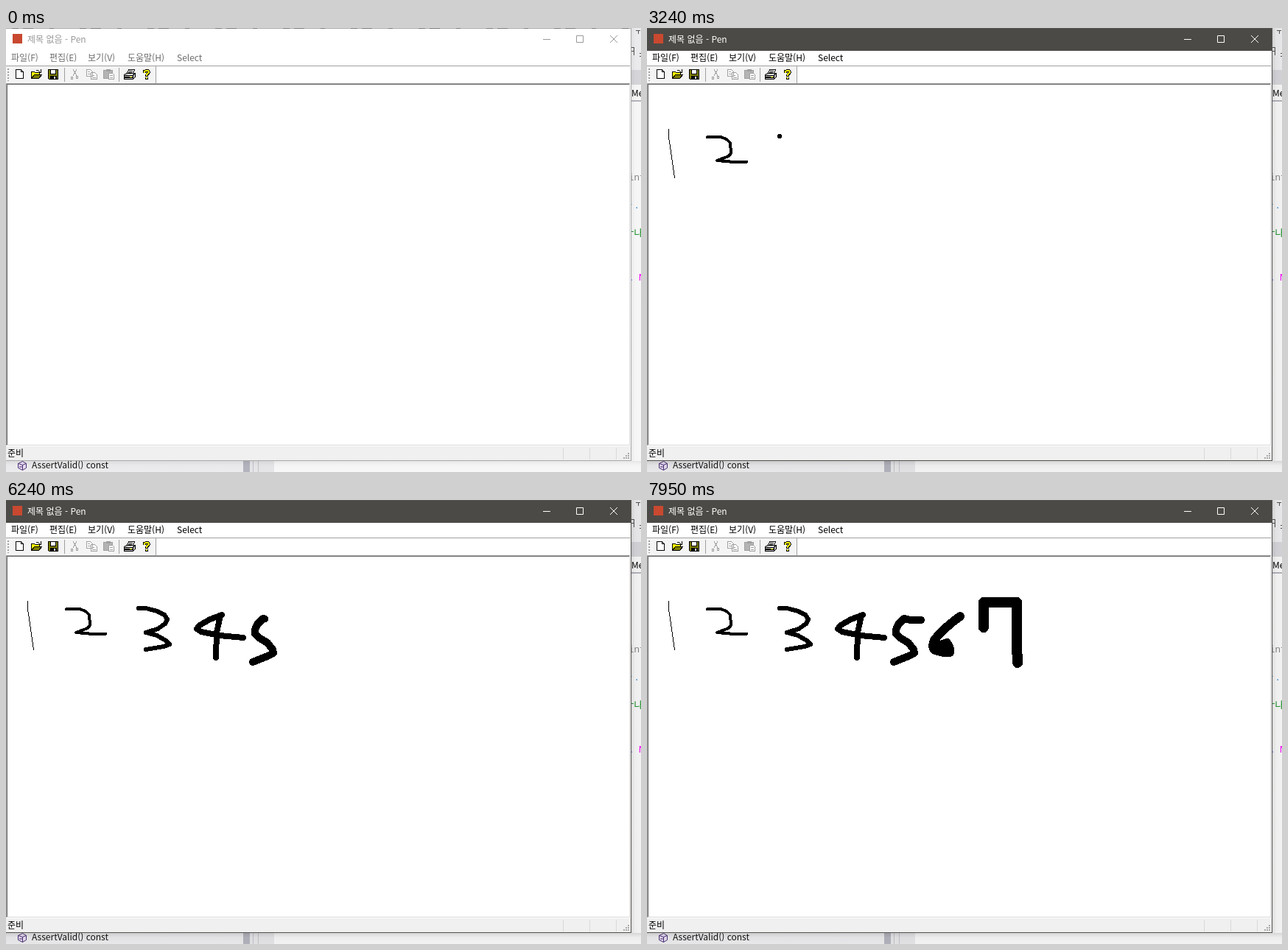
An HTML page that plays this animation: 862x603 px, repeating every 8000 ms.

```html
<!DOCTYPE html>
<html lang="ko">
<head>
<meta charset="utf-8">
<title>Pen</title>
<style>
  html, body { margin: 0; width: 100%; height: 100%; overflow: hidden; background: #fff; }
  svg {
    display: block; width: 862px; height: 603px;
    --bar: #fff; --title: #999; --menu: #6d6d6d; --control: #999; --edge: #a9a9a9; --shade: .6;
    font: 12px "Noto Sans CJK KR", "Noto Sans CJK", "Noto Sans", sans-serif;
  }
  svg.active { --bar: #4c4a46; --title: #fff; --menu: #000; --control: #fff; --edge: #55534f; --shade: 1; }
  .bar { fill: var(--bar); }
  .title { fill: var(--title); }
  .menu { fill: var(--menu); }
  .control { fill: none; stroke: var(--control); }
  .edge { fill: none; stroke: var(--edge); }
  .shadow { opacity: var(--shade); }
  .active .remnant { display: none; }
  .code { font: 12.5px "Noto Sans Mono", "Noto Sans CJK KR", monospace; }
  .crisp, #ink { shape-rendering: crispEdges; }
  #ink { fill: none; stroke: #000; stroke-linecap: round; stroke-linejoin: round; }
</style>
</head>
<body>
<svg id="stage" viewBox="0 0 862 603">
  <defs>
    <linearGradient id="side">
      <stop offset="0" stop-opacity=".16"/><stop offset=".4" stop-opacity=".07"/><stop offset="1" stop-opacity=".05"/>
    </linearGradient>
    <linearGradient id="under" href="#side" x2="0" y2="1"/>
  </defs>

  <!-- editor behind the window -->
  <rect width="862" height="603" fill="#fff"/>
  <g class="crisp">
    <path fill="#f3f3f5" d="M848 0h14v57h-14zM0 587h322v16H0z"/>
    <path fill="#dcdce1" d="M848 57h14v20h-14z"/>
    <path fill="#b9b9c4" d="M848 98h14v2h-14zM322 587h9v16h-9z"/>
    <path fill="#ededf0" d="M331 587h33v16h-33z"/>
    <path fill="#c8c8d0" d="M335 587h1v16h-1zM342 587h1v16h-1z"/>
    <path fill="none" stroke="#555" d="M847 26.5h5.5v10M847 31.5h5M860 34.5h2M860 38.5h2M855 3.5h6M858.5 3v5"/>
  </g>
  <text x="849" y="93">Me</text>
  <g class="code">
    <text x="845" y="207" fill="#888">int</text>
    <text x="841" y="245" fill="#1683d8">ㅏ.</text>
    <text x="841" y="283" fill="#078a16">ㅜ나</text>
    <text x="845" y="343" fill="#00f">.</text>
    <text x="859" y="343" fill="#f0f">N</text>
  </g>
  <g fill="#eee6fa" stroke="#51327b">
    <path d="M16.5 591.5l6-3 5 3v6l-5 3-6-3z"/>
    <path fill="none" d="M16.5 591.5l6 2 5-2M22.5 593.5v7M18 596h5"/>
  </g>
  <text x="35" y="598" fill="#111">AssertValid() const</text>
  <g class="shadow">
    <rect x="848" width="14" height="588" fill="url(#side)"/>
    <rect y="588" width="862" height="15" fill="url(#under)"/>
  </g>

  <!-- window frame -->
  <g class="crisp">
    <rect width="848" height="587" fill="#fff"/>
    <rect class="bar" width="848" height="31"/>
    <path class="edge" d="M0 .5h848.5v587H0"/>
    <path class="remnant" stroke="#777" stroke-dasharray="9 6 14 22 6 35" d="M8 .5h838"/>
    <path fill="#f0f0f0" d="M0 568h848v19H0z"/>
    <path fill="#f4f4f4" d="M0 52h203v23H0z"/>
    <path fill="none" stroke="#a0a0a0" d="M0 51.5h847M203.5 52v23M79.5 54v19M153.5 54v19M0 75.5h847M.5 76v491"/>
    <path fill="none" stroke="#696969" d="M1 76.5h845M1.5 76v490"/>
    <path fill="none" stroke="#d9d9d9" d="M1 566.5h846M846.5 76v491M756.5 570v16M792.5 570v16M828.5 570v16"/>
    <path stroke="#a0a0a0" stroke-width="2" stroke-dasharray="2 2" d="M3 55v17"/>
    <path stroke="#aaa" stroke-width="2" stroke-dasharray="2 1" d="M844 578h2M841 581h5M838 584h8"/>
  </g>
  <rect x="9" y="8" width="13" height="13" fill="#c8492f"/>
  <text class="title" x="29" y="20">제목 없음 - Pen</text>
  <path class="control" d="M729 15.5h10M774.5 10.5h9v9h-9zM820 10l10 10M830 10l-10 10"/>
  <g class="menu">
    <text x="7" y="45">파일(F)</text>
    <text x="59" y="45">편집(E)</text>
    <text x="111" y="45">보기(V)</text>
    <text x="165" y="45">도움말(H)</text>
    <text x="232" y="45">Select</text>
  </g>
  <text x="2" y="582">준비</text>

  <!-- toolbar icons -->
  <g class="crisp" stroke="#000" fill="#fff">
    <path d="M13.5 56.5h7l3 3v9h-10zM20.5 56.5v3h3"/>
    <path fill="#ff0" d="M34.5 68.5v-9h4l1 1h6v3"/>
    <path fill="#808000" d="M34.5 68.5l4-5h10l-4 5z"/>
    <path fill="none" d="M41 57.5h2l3 2M47.5 56v4h-4"/>
    <path fill="#808000" d="M57.5 56.5h13v13h-12l-1-1z"/>
    <path d="M60.5 56.5h7v6h-7z"/>
    <path fill="#000" d="M60.5 65.5h8v4h-8z"/>
    <path stroke="#fff" stroke-width="2" d="M66 66v3"/>
    <g stroke="#a0a0a0">
      <path fill="none" d="M91 56l5 9M96 56l-5 9M88.5 66.5h2v3h-2zM95.5 65.5h2v3h-2z"/>
      <path d="M109.5 56.5h5l3 3v6h-8zM115.5 60.5h5l3 3v6h-8z"/>
      <path d="M111 59.5h3M111 62.5h4M117 64.5h3M117 67.5h5"/>
      <path fill="#b4b4b4" d="M132.5 57.5h12v11h-12zM136 56.5h5v2h-5z"/>
      <path d="M139.5 61.5h5l2 2v6h-7zM141 64.5h4M141 67.5h4"/>
    </g>
    <path d="M164.5 61.5l2-5h8l-2 5zM167 58.5h5M166 60.5h5"/>
    <path fill="#c0c0c0" d="M160.5 63.5l3-2h12v5l-3 3h-12zM160 64.5h12l3-3M172.5 65v4"/>
    <path stroke-width="2" d="M161 67h11"/>
    <path stroke="#ff0" d="M168 66.5h3"/>
    <g fill="none">
      <path stroke-width="4" d="M188 61v-2l2-1h3l1 2-3 4v2M191 67v3"/>
      <path stroke="#ff0" stroke-width="2" d="M188 61v-2l2-1h3l1 2-3 3v2M191 67v2"/>
    </g>
  </g>
  <g id="ink"></g>
</svg>
<script>
const LOOP = 8000, TICK = 30, ACTIVATED = 1080;
const stage = document.getElementById('stage');
const ink = document.getElementById('ink');

// from, until: drawing time in ms; lead: share already drawn at the first moment
const strokes = [
  { from: 1140, until: 1290, width: 1, lead: .1, d: 'M29.5 137.5V148L37.5 203.5' },
  { from: 2040, until: 2460, width: 4, d: 'M82 148H100L108 151L113 156L114 170L111 174L95 180L107 181L118 182H135' },
  { from: 3240, until: 3720, width: 6, d: 'M180 147H190L205 151L215 156L219 162L216 168L206 175L190 180L205 184L217 191L222 196L214 199L190 203' },
  { from: 4590, until: 4830, width: 8, lead: .17, d: 'M293 156L277 162L263 170L259 175L265 179L290 184L322 187' },
  { from: 5130, until: 5250, width: 8, lead: .15, d: 'M291 157L286 180L285 214' },
  { from: 5790, until: 6180, width: 10, lead: .02, d: 'M349 161L341 169L338 176V182L345 188L355 194L362 203L363 208L355 212L335 220' },
  { from: 6240, until: 6330, width: 10, lead: .1, d: 'M349 161L358 163H372' },
  { from: 6750, until: 6870, width: 12, lead: .1, d: 'M425 158Q403 174 390 190Q386 200 391 204L403 207' },
  { from: 6900, until: 7080, width: 12, lead: .1, d: 'M403 207H411Q413 203 407 194L396 198' },
  { from: 7500, until: 7620, width: 14, d: 'M457 139V173' },
  { from: 7680, until: 7950, width: 14, d: 'M457 139H502V197L503 221' }
];

for (const stroke of strokes) {
  const path = document.createElementNS(stage.namespaceURI, 'path');
  path.setAttribute('d', stroke.d);
  path.setAttribute('stroke-width', stroke.width);
  path.setAttribute('pathLength', 1);
  stroke.path = ink.appendChild(path);
}

function draw(now) {
  const time = Math.floor(now % LOOP / TICK) * TICK;
  stage.classList.toggle('active', time >= ACTIVATED);
  for (const { from, until, lead = .001, path } of strokes) {
    const progress = Math.min(1, (time - from) / (until - from));
    path.style.display = progress < 0 ? 'none' : '';
    path.style.strokeDasharray = progress < 1 ? `${lead + (1 - lead) * Math.max(0, progress)} 2` : 'none';
  }
}

const start = performance.now();
function frame() {
  draw(performance.now() - start);
  requestAnimationFrame(frame);
}
frame();
</script>
</body>
</html>
```
